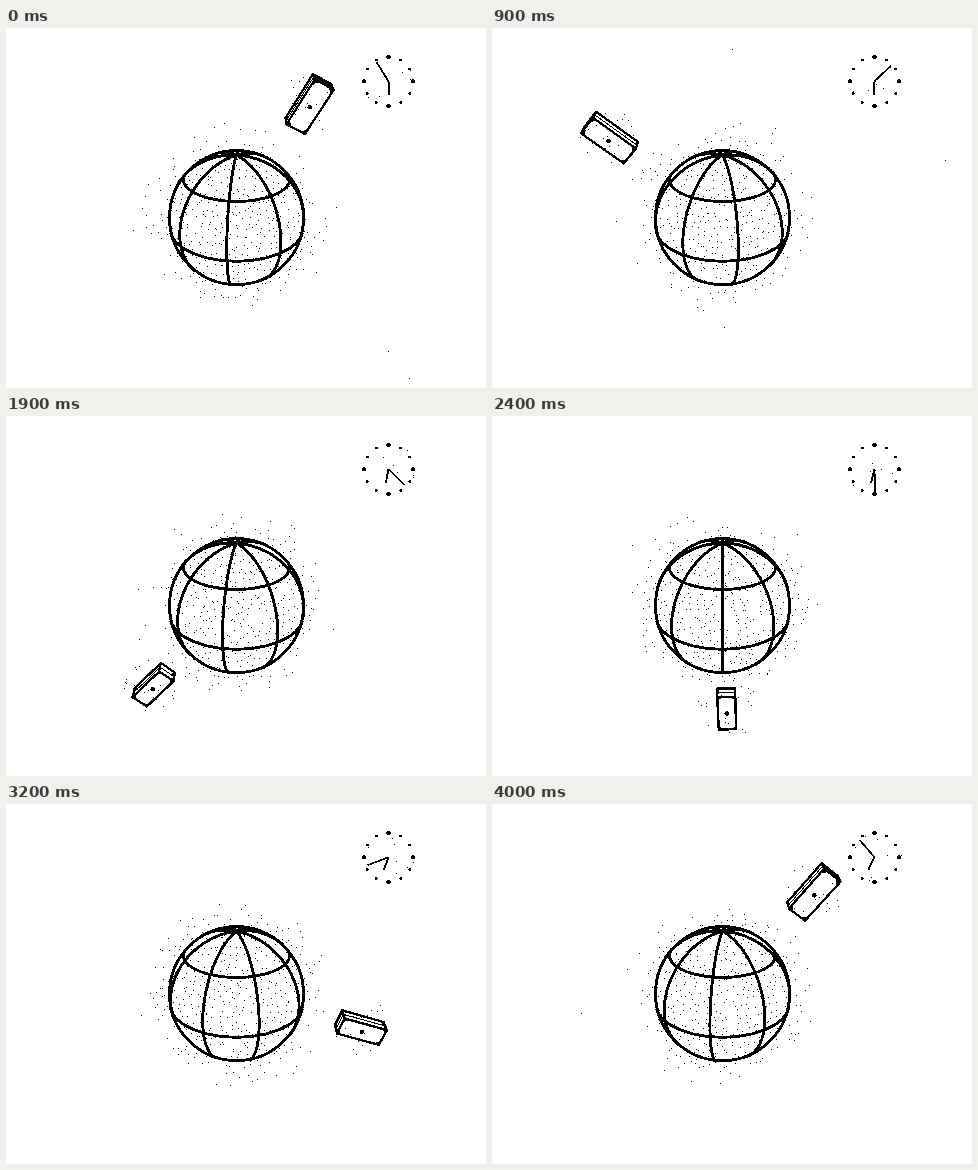
Animation, 480 px wide and 360 px high, one loop 4100 ms. Source, as an HTML page with a canvas:

```html
<!DOCTYPE html>
<html lang="en">
<head>
<meta charset="utf-8">
<title>Around the world</title>
<style>
  html, body { margin: 0; width: 100%; height: 100%; overflow: hidden; background: #fff; }
  canvas { display: block; width: 480px; height: 360px; }
</style>
</head>
<body>
<canvas id="stage" width="480" height="360"></canvas>
<script>
const W = 480, H = 360, STEP = 100, STEPS = 41;
const ctx = document.getElementById('stage').getContext('2d', { willReadFrequently: true });
const RAD = Math.PI / 180, TAU = Math.PI * 2;

const camera = { x: 230.5, y: 189.7, depth: 583 };
const globe = { r: 67, tilt: 28 * RAD, meridians: 8 };
const orbit = { r: 135, tilt: 31 * RAD };
const note = { length: 47, width: 19.5, height: 15 };
const clock = { x: 382.5, y: 53.2, r: 24.5 };

function random(seed) {
  let s = seed;
  return () => {
    s = (s + 0x6D2B79F5) | 0;
    let t = Math.imul(s ^ (s >>> 15), 1 | s);
    t = (t + Math.imul(t ^ (t >>> 7), 61 | t)) ^ t;
    return ((t ^ (t >>> 14)) >>> 0) / 4294967296;
  };
}

// Perspective view of a point in a plane tilted towards the viewer.
function view(side, front, up, tilt) {
  const c = Math.cos(tilt), s = Math.sin(tilt);
  const z = front * c + up * s;
  const scale = camera.depth / (camera.depth - z);
  return { z, x: camera.x + side * scale, y: camera.y - (up * c - front * s) * scale };
}

function dot(x, y, r) {
  ctx.beginPath();
  ctx.arc(x, y, r, 0, TAU);
  ctx.fill();
}

function polygon(points) {
  ctx.beginPath();
  points.forEach(p => ctx.lineTo(p.x, p.y));
  ctx.closePath();
}

// Strokes only the part of a line on the sphere that faces the viewer.
function sphereLine(from, to, latLon) {
  const { r, tilt } = globe;
  let drawing = false;
  ctx.beginPath();
  for (let i = 0; i <= 120; i++) {
    const [lat, lon] = latLon(from + (to - from) * i / 120);
    const ring = r * Math.cos(lat);
    const p = view(ring * Math.sin(lon), ring * Math.cos(lon), r * Math.sin(lat), tilt);
    const visible = p.z >= r * r / camera.depth;
    if (visible && drawing) ctx.lineTo(p.x, p.y);
    else if (visible) ctx.moveTo(p.x, p.y);
    drawing = visible;
  }
  ctx.stroke();
}

function drawGlobe(step) {
  const gap = TAU / globe.meridians;
  const turn = -7.5 * RAD + 2 * gap * step / STEPS;
  ctx.lineWidth = 2.8;
  ctx.beginPath();
  ctx.arc(camera.x, camera.y, globe.r, 0, TAU);
  ctx.stroke();
  for (let i = 0; i < globe.meridians; i++) {
    sphereLine(-Math.PI / 2, Math.PI / 2, lat => [lat, turn + i * gap]);
  }
  for (const lat of [40.5 * RAD, -8 * RAD]) {
    sphereLine(-Math.PI, Math.PI, lon => [lat, lon]);
  }
}

const noteAngle = step => 61.3 * RAD + TAU * step / STEPS;

// Places a radial, tangential and normal offset from the orbiting notes.
function onOrbit(angle, radial, tangent, normal) {
  const r = orbit.r + radial;
  const side = r * Math.cos(angle) - tangent * Math.sin(angle);
  const back = r * Math.sin(angle) + tangent * Math.cos(angle);
  return view(side, normal, back, orbit.tilt);
}

function drawNotes(step) {
  const angle = noteAngle(step);
  const l = note.length / 2, w = note.width / 2, top = note.height / 2;
  const corners = [[l, w], [l, -w], [-l, -w], [-l, w]];
  const face = h => corners.map(([a, b]) => onOrbit(angle, a, b, h));
  const sheet = (h, width) => {
    polygon(face(h));
    ctx.fillStyle = '#fff';
    ctx.fill();
    ctx.lineWidth = width;
    ctx.stroke();
  };
  sheet(-top, 2.2);
  sheet(0, 1);
  const lower = face(-top);
  ctx.lineWidth = 2;
  face(top).forEach((p, i) => {
    polygon([p, lower[i]]);
    ctx.stroke();
  });
  sheet(top, 2.2);
  ctx.fillStyle = '#000';
  for (const a of [-1, 1]) {
    for (const b of [-1, 1]) {
      polygon([[l, w], [l - 5, w], [l, w - 5]].map(([u, v]) => onOrbit(angle, a * u, b * v, top)));
      ctx.fill();
    }
  }
  const middle = onOrbit(angle, 0, 0, top);
  dot(middle.x, middle.y, 2.3);
}

function hand(degrees, length, width) {
  const a = degrees * RAD;
  ctx.lineWidth = width;
  ctx.beginPath();
  ctx.moveTo(clock.x, clock.y);
  ctx.lineTo(clock.x + length * Math.sin(a), clock.y - length * Math.cos(a));
  ctx.stroke();
}

function drawClock(step) {
  for (let i = 0; i < 12; i++) {
    const a = i * TAU / 12;
    dot(clock.x + clock.r * Math.sin(a), clock.y - clock.r * Math.cos(a), i % 3 ? 1.4 : 2.2);
  }
  hand(328 + 360 * step / STEPS, 22.5, 1.7);
  hand(177 + 30 * step / STEPS, 14, 1.8);
}

function drawStipple(step) {
  const rand = random(977 + step * 131);
  const notes = onOrbit(noteAngle(step), 0, 0, 0);
  const cell = 6;
  for (let y = 0; y < H; y += cell) {
    for (let x = 0; x < W; x += cell) {
      const px = x + rand() * cell, py = y + rand() * cell, roll = rand();
      const d = Math.hypot(px - camera.x, py - camera.y) - globe.r;
      let chance = d < 0 ? 0.8 : 0.6 * Math.exp(-d * d / 320);
      if (Math.hypot(px - notes.x, py - notes.y) < 30) chance = Math.max(chance, 0.3);
      if (Math.hypot(px - clock.x, py - clock.y) < 27) chance = Math.max(chance, 0.12);
      if (roll < chance + 0.0003) ctx.fillRect(Math.floor(px), Math.floor(py), 1, 1);
    }
  }
}

// Pure black ink on white paper.
function harden() {
  const image = ctx.getImageData(0, 0, W, H), px = image.data;
  for (let i = 0; i < px.length; i += 4) {
    px[i] = px[i + 1] = px[i + 2] = px[i] < 140 ? 0 : 255;
  }
  ctx.putImageData(image, 0, 0);
}

function draw(step) {
  ctx.fillStyle = '#fff';
  ctx.fillRect(0, 0, W, H);
  ctx.fillStyle = ctx.strokeStyle = '#000';
  ctx.lineJoin = 'round';
  drawGlobe(step);
  drawNotes(step);
  drawClock(step);
  drawStipple(step);
  harden();
}

let shown = -1;
function tick() {
  const step = Math.floor(performance.now() / STEP) % STEPS;
  if (step !== shown) draw(shown = step);
  requestAnimationFrame(tick);
}
tick();
</script>
</body>
</html>
```
